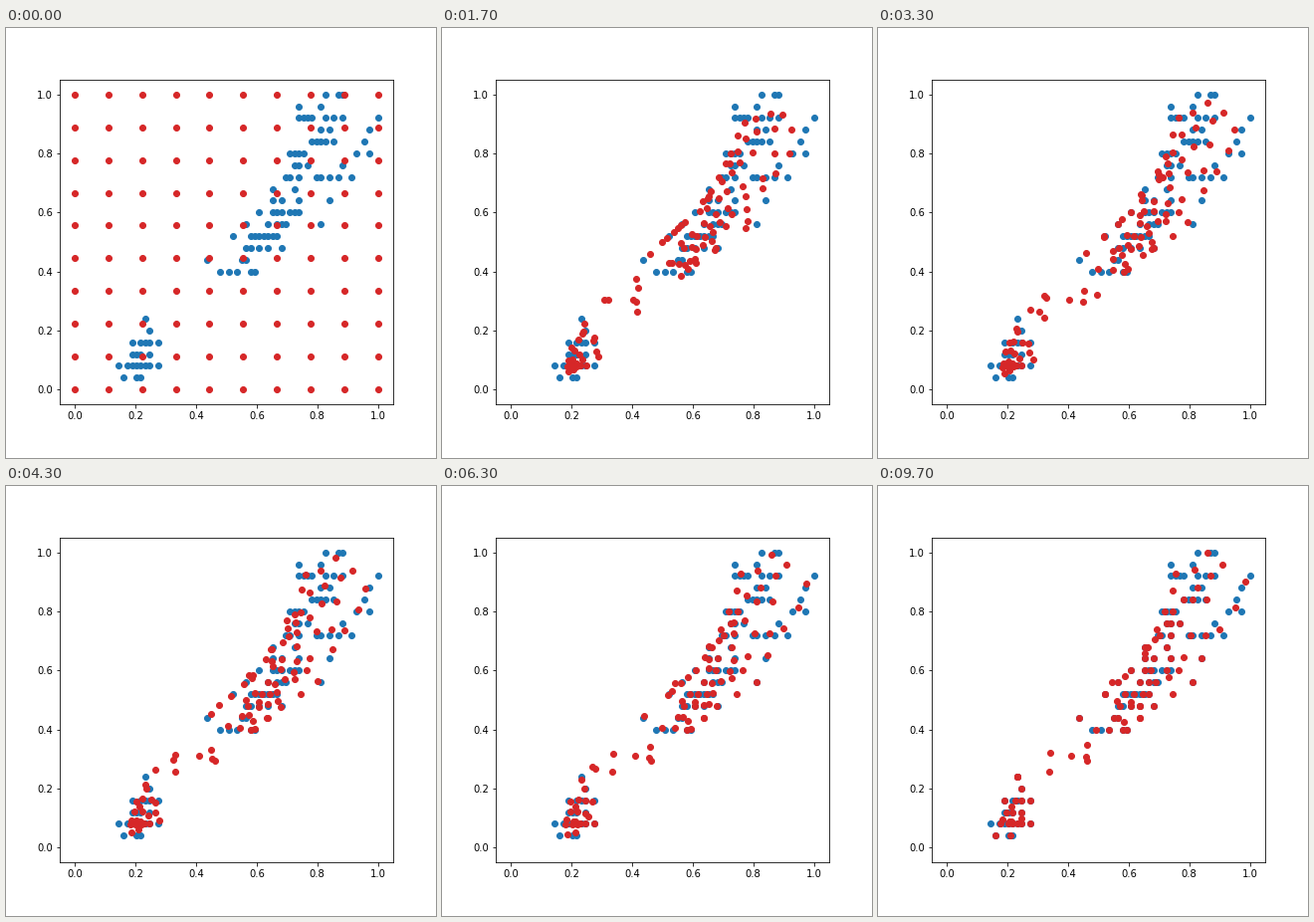
A matplotlib script that plays this animation: 432x432 px, repeating every 10 s.

```python
import numpy as np
import matplotlib.pyplot as plt
from matplotlib.animation import FuncAnimation

SIDE = 10      # the map is SIDE x SIDE nodes
EPOCHS = 30
TICK = 100     # ms

# Sample lengths as runs, per width; both in tenths
run = np.r_
LENGTHS = {
    1: run[11, 14:16], 2: run[10, 12:18, 19], 3: run[13:16, 17],
    4: run[13, 15:18, 19], 5: run[17:18], 6: run[16:17],
    10: run[33:38:2, 40:42], 11: run[30, 38:40], 12: run[39, 40:45:2, 47],
    13: run[36, 40:47], 14: run[39, 44, 46:49, 56], 15: run[42, 45:48, 49:52],
    16: run[45:48:2, 51, 58], 17: run[45:51:5], 18: run[48, 49:52:2, 55, 56:61:2, 63],
    19: run[50:52, 53, 61], 20: run[49:53, 64:68:3], 21: run[54:58, 59, 66],
    22: run[56:59:2, 67], 23: run[51:55, 57:62:2, 69], 24: run[51:57:5],
    25: run[57, 60:62],
}

raw = np.array([(l, w) for w, row in LENGTHS.items() for l in row], float)
samples = raw / raw.max(axis=0)

# Samples crowd in the middle of the small cluster
length, width = raw.T
crowd = 1 + 6 * np.exp(-(length - 14.5) ** 2 / 2 - 2 * (width - 2) ** 2)


def dist2(a, b):
    return ((a[:, None] - b[None]) ** 2).sum(axis=2)


cells = np.array([(i, j) for i in range(SIDE) for j in range(SIDE)], float)
cell_d2 = dist2(cells, cells)


def train(nodes, epoch):
    """One batch step of a self-organizing map with a shrinking reach."""
    reach = 0.95 * np.exp(-epoch / 24)
    best = dist2(samples, nodes).argmin(axis=1)
    d2 = cell_d2[:, best]
    d2 = d2 - d2.min(axis=1, keepdims=True)
    pull = crowd * np.exp(-d2 / (2 * reach ** 2))
    return pull @ samples / pull.sum(axis=1, keepdims=True)


states = [cells / (SIDE - 1)]
for epoch in range(1, EPOCHS):
    states.append(train(states[-1], epoch))

plt.rcParams["font.family"] = "DejaVu Sans"
plt.rcParams["font.size"] = 10
fig = plt.figure(figsize=(6, 6), dpi=72, facecolor="white")
ax = fig.add_axes([0.125, 0.125, 0.775, 0.755])
ax.set(xlim=(-0.05, 1.05), ylim=(-0.05, 1.05))
ticks = np.linspace(0, 1, 6)
ax.set_xticks(ticks)
ax.set_yticks(ticks)

ax.scatter(*samples.T, color="tab:blue")
dots = ax.scatter(*states[0].T, color="tab:red")


def draw(tick):
    dots.set_offsets(states[(3 * tick + 1) // 10])
    return (dots,)


def reset():
    return draw(0)


anim = FuncAnimation(fig, draw, frames=100, init_func=reset,
                     interval=TICK, repeat=True, repeat_delay=0)
plt.show()
```
